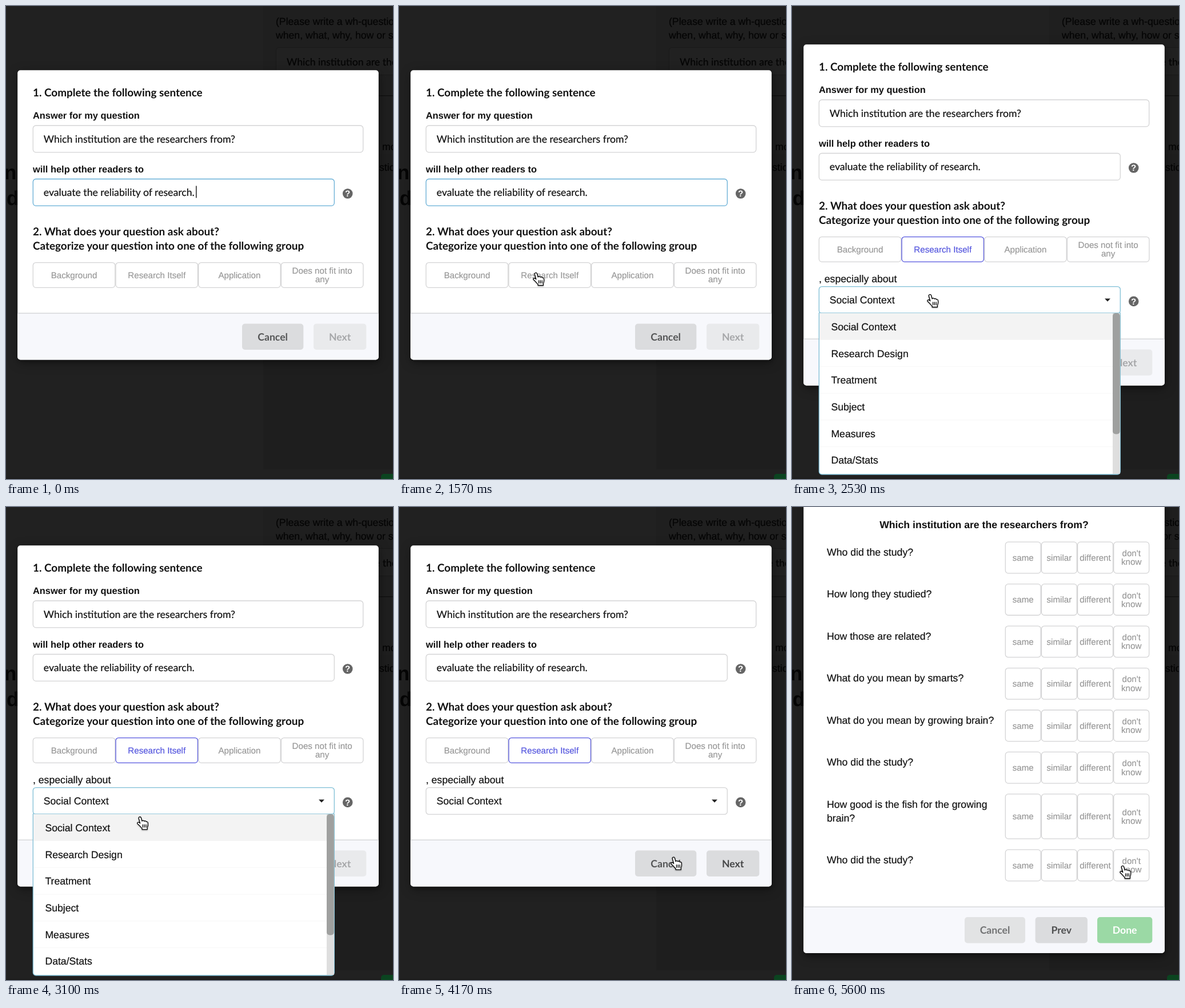
Recreate the animation shown at these times as an HTML page. Size 677 by 827 pixels, loop 5.63 s.

```html
<!DOCTYPE html>
<html lang="en">
<head>
<meta charset="utf-8">
<title>Question dialog</title>
<style>
  html, body { margin: 0; width: 100%; height: 100%; overflow: hidden; background: #212121; }
  svg { display: block; }
  text {
    font-family: "Liberation Sans", Arial, sans-serif; font-size: 17.65px; text-rendering: geometricPrecision;
    color: #111; fill: currentColor; stroke: currentColor; stroke-width: .2;
  }
  .lato { font-family: Lato, sans-serif; }
  .bold { font-weight: 700; stroke: none; }
  .h { font-size: 18.9px; }
  .label { font-size: 16.4px; }
  .choice { font-size: 15.13px; color: #999; }
  .mid { text-anchor: middle; }
  .dim text { color: #050505; }
  .box { fill: #fff; stroke: #d4d4d5; stroke-width: 1.3; }
  .panel { fill: #fff; filter: drop-shadow(1px 4px 3px #0004) drop-shadow(1px 4px 9px #0005); }
  .hand, .arrow { stroke-linejoin: round; stroke-linecap: round; filter: drop-shadow(0 1px 1px #0005); }
  .hand { fill: #fff; stroke: #000; stroke-width: 1.3; }
  .arrow { fill: #000; stroke: #fff; stroke-width: 1.2; }
</style>
</head>
<body>
<svg id="stage" width="677" height="827" viewBox="0 0 677 827"></svg>
<script>
const LOOP = 5630, GROW = 45;
const EXPAND = 1700, OPEN = 2320, CLOSE = 3830, PRESS = 5400, COMPARE = 5470;

const text = (x, y, str, cls = '', extra = '') =>
  `<text x="${x}" y="${y}" class="${cls}" ${extra}>${str}</text>`;
const rect = (x, y, w, h, r, extra) =>
  `<rect x="${x}" y="${y}" width="${w}" height="${h}" rx="${r}" ${extra}/>`;
const box = (x, y, w, h, extra = '') => rect(x, y, w, h, 5, `class="box" ${extra}`);
const group = (id, body, extra = '') => `<g id="${id}" ${extra}>${body}</g>`;

// Label of one or two centred lines inside a bordered box
const choice = (x, y, w, h, label, id = '') => {
  const lines = label.split('|'), first = y + h / 2 + 5.2 - (lines.length - 1) * 7.6;
  return `<g id="${id}">` + box(x, y, w, h) +
    lines.map((s, i) => text(x + w / 2, first + i * 15.2, s, 'choice mid')).join('') + '</g>';
};
const button = (x, y, w, label, fill, ink, id = '') => `<g id="${id}">` +
  rect(x, y, w, 45.4, 5, `fill="${fill}"`) +
  text(x + w / 2, y + 29, label, 'lato bold mid', `style="color:${ink}"`) + '</g>';
const help = y => `<circle cx="597.7" cy="${y}" r="8.8" fill="#666"/>` +
  text(597.7, y + 5.4, '?', 'bold mid', 'style="color:#fff;font-size:15px"');
const footer = (top, bottom) =>
  `<path d="M20.2 ${top}H651.8V${bottom - 5}a5 5 0 0 1-5 5H25.2a5 5 0 0 1-5-5Z" fill="#f7f8fc"/>` +
  rect(20.2, top - .5, 631.6, 1.3, 0, 'fill="#d2d3d5"');

const backdrop = group('backdrop',
  rect(450, 0, 227, 810, 0, 'fill="#1f1f1f"') +
  rect(450, 259, 227, 551, 0, 'fill="#1e1e1e"') +
  rect(472.5, 72.5, 240, 48, 5, 'fill="#212121" stroke="#191919"') +
  rect(472, 156, 205, 1.5, 0, 'fill="#111"') +
  rect(0, 825.5, 677, 1.5, 0, 'fill="#191919"') +
  rect(656, 818, 40, 30, 5, 'fill="#0b4420"') +
  text(472, 33, '(Please write a wh-question: who,') +
  text(472, 57, 'when, what, why, how or so on)') +
  text(491, 103.5, 'Which institution are the', 'lato') +
  text(658, 252, 'more') + text(653, 288, 'stions') +
  text(-3, 303, 'n', 'bold', 'style="font-size:35px"') +
  text(1, 348, 'd', 'bold', 'style="font-size:35px"'), 'class="dim"');

const head = group('head',
  text(47, 157.6, '1. Complete the following sentence', 'lato bold h') +
  text(47, 197, 'Answer for my question', 'bold label') +
  box(47.3, 209, 577.4, 46.8) +
  text(65.8, 238.5, 'Which institution are the researchers from?', 'lato') +
  text(47, 290.6, 'will help other readers to', 'bold label') +
  box(47.3, 302.5, 527, 46.8, 'id="field"') +
  text(65.8, 332.1, 'evaluate the reliability of research.', 'lato') +
  rect(332.2, 314.5, 1.3, 21, 0, 'id="caret" fill="#000"') +
  help(328) +
  text(47, 401.3, '2. What does your question ask about?', 'lato bold h') +
  text(47, 425.5, 'Categorize your question into one of the following group', 'lato bold h') +
  ['Background', 'Research Itself', 'Application', 'Does not fit into|any']
    .map((s, i) => choice(47.3 + i * 144.7, 448.6, 143.5, 43.7, s, i == 1 ? 'chosen' : '')).join(''));

const foot = group('foot', footer(537, 618.5) +
  button(413, 555.6, 107.3, 'Cancel', '#dbdcde', '#545556') +
  button(538, 555.6, 92.3, 'Next', '#e9eaec', '#a6a7a9', 'next'));

const extra = group('extra',
  text(47, 483.4, ', especially about') +
  box(47.3, 490.6, 527, 46.8, 'id="select"') +
  text(65.8, 520, 'Social Context', '', 'id="picked"') +
  '<path d="M547 511.5h10l-5 5.3Z" fill="#222"/>' + help(516.4));

const options = ['Social Context', 'Research Design', 'Treatment', 'Subject', 'Measures', 'Data/Stats'];
const menu = group('menu',
  '<path d="M47.3 537V814a5 5 0 0 0 5 5H569.3a5 5 0 0 0 5-5V537Z" fill="#fff" stroke="#7fbfd6" stroke-width="1.3"/>' +
  rect(48, 537, 513, 46.7, 0, 'fill="#f3f3f3"') +
  options.map((s, i) => (i > 1 ? rect(48, 536.5 + i * 46.7, 513, 1.2, 0, 'fill="#f8f8f8"') : '') +
    text(68.4, 566.8 + i * 46.7, s)).join('') +
  rect(561, 537, 12.8, 281, 0, 'fill="#dedede"') +
  rect(561, 537, 12.8, 211.5, 5, 'fill="#9fa09f"'));

const questions = ['Who did the study?', 'How long they studied?', 'How those are related?',
  'What do you mean by smarts?', 'What do you mean by growing brain?', 'Who did the study?',
  'How good is the fish for the growing|brain?', 'Who did the study?'];
const compare = group('compare',
  rect(20.2, -20, 631.6, 800, 5, 'class="panel"') +
  text(336, 36.8, 'Which institution are the researchers from?', 'bold mid') +
  questions.map((q, i) => {
    const y = i == 7 ? 599.2 : 61.2 + i * 73.45, h = i == 6 ? 78.2 : 54.6;
    return q.split('|').map((s, n) => text(61, y + 23.8 + n * 24, s)).join('') +
      ['same', 'similar', 'different', "don't|know"]
        .map((s, n) => choice(373.3 + n * 63.15, y, 61.9, h, s)).join('');
  }).join('') + footer(699, 780) +
  button(302, 717, 106, 'Cancel', '#e2e3e4', '#727374') +
  button(425.6, 717, 91.3, 'Prev', '#dbdcde', '#4e4f50') +
  button(534, 717, 96.3, 'Done', '#9bd9a5', '#fff'));

const pointer = group('pointer',
  `<g id="hand" class="hand"><path d="M-2.6 2.2C-3.4-.6.6-1.6 1.5 1L3.2 7C4.2 5.4 6.6 5.6 7 7.2C8.2 6 10.2 6.6 10.4 8.2
   C11.8 7.4 13.4 8.4 13.5 10C14 13 13.6 15.5 12.4 18V21.5H3.2V19.5C1 17.6-1 14.6-4.6 11.6C-6 9.8-3.8 7.8-1.6 9.4L-.2 10.7Z"/>
   <path d="M4.6 13v4.6M7.4 13v4.6M10.2 13v4.6"/></g>
   <path id="arrow" class="arrow" d="M0 0V17.2L3.9 13.4L6.7 19.8L9.9 18.5L7.2 12.1H12.4Z"/>
   <path id="beam" d="M-4-10Q0-10 0-7Q0-10 4-10M0-7V7M-4 10Q0 10 0 7Q0 10 4 10" fill="none" stroke="#222" stroke-width="1.3"/>`);

const stage = document.getElementById('stage');
stage.innerHTML = backdrop +
  group('dialog', rect(20.2, 112.3, 631.6, 506.2, 5, 'id="panel" class="panel"') + head + foot + extra + menu) +
  compare + pointer;
const $ = id => document.getElementById(id);

// Pointer stops: time, x, y
const stops = [[570, 113, 300], [1130, 232, 470], [1230, 233, 471.5], [1370, 233, 471.5],
  [1530, 240, 467], [1730, 240, 467], [1930, 240, 495.5], [2270, 240, 495.5], [2500, 242, 505],
  [2800, 242, 505], [3330, 230, 567], [3590, 230, 567], [3600, 232, 565],
  [3860, 232, 565], [4330, 571, 630], [4500, 571, 630], [4730, 579, 628]];

const clamp = v => Math.max(0, Math.min(1, v));
const ease = v => v * v * (3 - 2 * v);
const mix = (a, b, k) => a + (b - a) * k;
const blend = (a, b, k) => `rgb(${a.map((v, i) => Math.round(mix(v, b[i], k)))})`;
const show = (id, on) => { $(id).style.display = on ? '' : 'none'; };

function pointerAt(t) {
  const i = stops.findIndex(s => s[0] > t);
  if (i < 0) return stops[stops.length - 1].slice(1);
  if (i == 0) return stops[0].slice(1);
  const a = stops[i - 1], b = stops[i], k = ease((t - a[0]) / (b[0] - a[0]));
  return [mix(a[1], b[1], k), mix(a[2], b[2], k)];
}

function pointerKind(t, x, y) {
  const within = (l, top, r, bottom) => x >= l && x <= r && y >= top && y <= bottom;
  if (t < EXPAND) {
    if (y >= 448) return 'hand';
    return y < 350 || within(47, 385, 522, 430) ? 'beam' : 'arrow';
  }
  if (t < 3600) return 'hand';
  return t > CLOSE && (within(413, 601, 520, 647) || within(538, 601, 630, 647)) ? 'hand' : 'arrow';
}

function render(t) {
  const grown = t >= EXPAND, open = t >= OPEN && t < CLOSE + 130, shift = grown ? GROW : 0;
  show('dialog', t < COMPARE);
  show('compare', t >= COMPARE);

  $('panel').setAttribute('y', 112.3 - shift);
  $('panel').setAttribute('height', 506.2 + 2 * shift);
  $('head').setAttribute('transform', `translate(0 ${-shift})`);
  $('foot').setAttribute('transform', `translate(0 ${shift})`);
  show('extra', grown);

  $('field').style.stroke = t < OPEN ? '#66aed6' : '';
  show('caret', t < OPEN && (t < 430 || Math.floor((t - 430) / 500) % 2 == 1));

  const active = clamp((t - 1670) / 100);
  const [border, label] = $('chosen').children;
  border.style.stroke = blend([212, 212, 213], [84, 86, 222], active);
  label.style.color = blend([153, 153, 153], [84, 86, 222], active);

  $('select').style.stroke = open ? '#7fbfd6' : t < OPEN && t > 1900 ? '#9a9b9b' : '';
  show('picked', t >= OPEN);
  show('menu', open);
  const unfold = t < CLOSE ? ease(clamp((t - OPEN) / 200)) : 1 - ease(clamp((t - CLOSE) / 130));
  $('menu').setAttribute('transform', `translate(0 537) scale(1 ${unfold}) translate(0 -537)`);
  $('menu').style.opacity = unfold;

  const enabled = clamp((t - CLOSE) / 100), hover = clamp((t - 4240) / 100);
  const [face, caption] = $('next').children;
  face.style.fill = blend([mix(233, 219, enabled), mix(234, 220, enabled), mix(236, 222, enabled)],
    t >= PRESS ? [181, 182, 184] : [193, 194, 196], hover);
  caption.style.color = blend([166, 167, 169], [36, 37, 38], mix(enabled * .75, 1, hover));

  const [x, y] = pointerAt(t), kind = pointerKind(t, x, y);
  show('pointer', t >= 570);
  $('pointer').setAttribute('transform', `translate(${x} ${y})`);
  for (const id of ['hand', 'arrow', 'beam']) show(id, id == kind);
}

const start = performance.now();
function tick() {
  render((performance.now() - start) % LOOP);
  requestAnimationFrame(tick);
}
tick();
</script>
</body>
</html>
```
